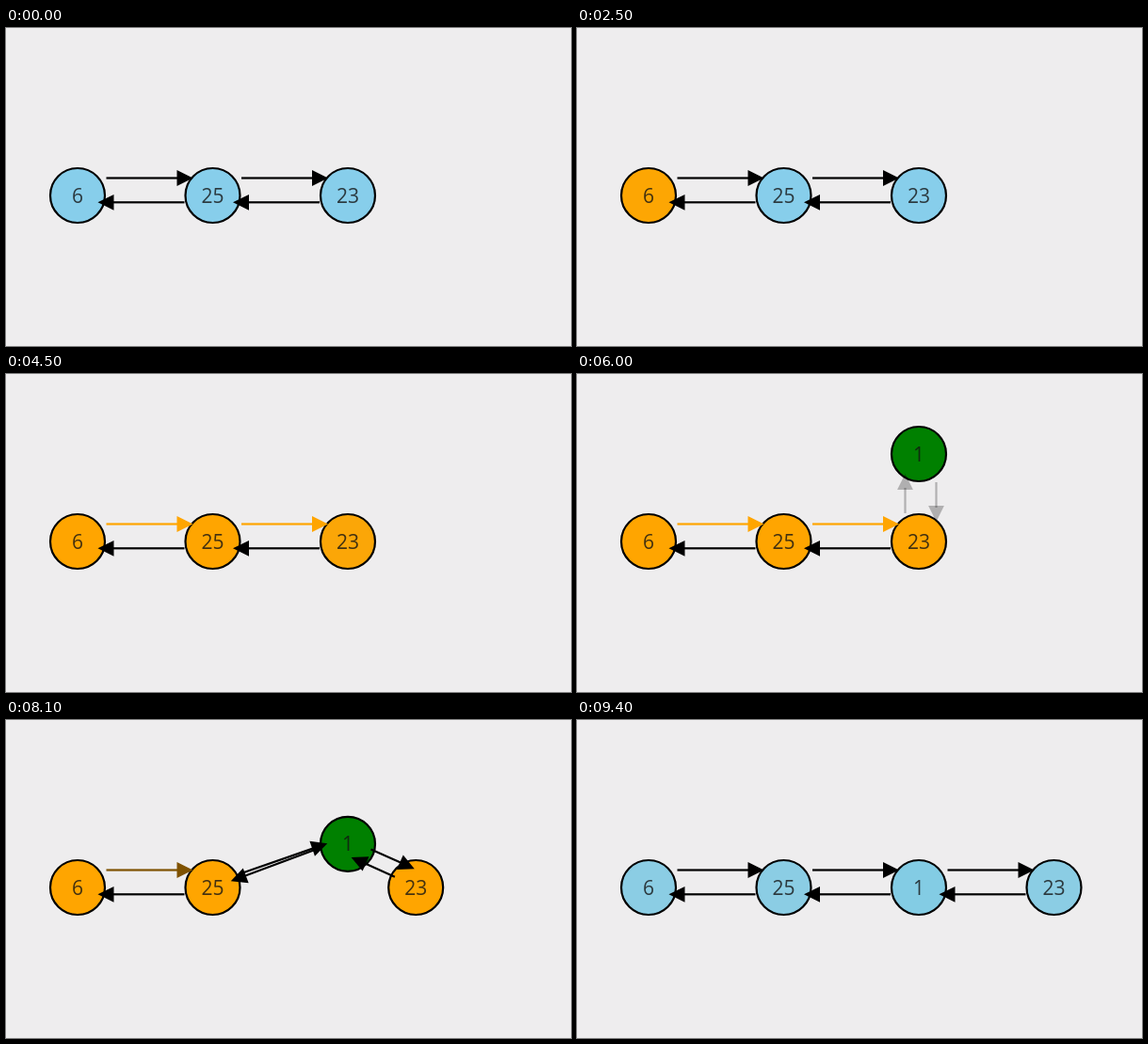
An HTML page with a canvas for the animation above (9.5 s loop, 600 by 338 pixels).

```html
<!DOCTYPE html>
<html lang="en">
<head>
<meta charset="utf-8">
<title>Linked list insertion</title>
<style>
html, body { margin: 0; width: 100%; height: 100%; overflow: hidden; background: #eeedee; }
canvas { display: block; width: 600px; height: 338px; }
</style>
</head>
<body>
<canvas id="stage" width="600" height="338"></canvas>
<script>
const ctx = document.getElementById('stage').getContext('2d');
const LOOP = 9500;
const SKY = [135, 206, 235], ORANGE = [255, 165, 0], GREEN = [0, 128, 0], BLACK = [0, 0, 0];
const ROW = 178;

// Cubic ease-in-out progress of a step
function step(t, start, length = 1000) {
  const p = Math.min(1, Math.max(0, (t - start) / length));
  return p < 0.5 ? 4 * p ** 3 : 1 - 4 * (1 - p) ** 3;
}

const lerp = (a, b, p) => a + (b - a) * p;
const mix = (a, b, p) => a.map((v, i) => lerp(v, b[i], p));
const rgb = c => `rgb(${c.map(Math.round).join(',')})`;

function node(x, y, label, color, alpha = 1) {
  ctx.globalAlpha = alpha;
  ctx.beginPath();
  ctx.arc(x, y, 29, 0, Math.PI * 2);
  ctx.fillStyle = rgb(color);
  ctx.fill();
  ctx.lineWidth = 2.2;
  ctx.strokeStyle = '#000';
  ctx.stroke();
  ctx.fillStyle = 'rgba(20,20,20,0.8)';
  ctx.fillText(label, x, y + 7.5);
  ctx.globalAlpha = 1;
}

function arrow([x1, y1, x2, y2], color = BLACK, alpha = 1) {
  const len = Math.hypot(x2 - x1, y2 - y1);
  ctx.save();
  ctx.globalAlpha = alpha;
  ctx.translate(x1, y1);
  ctx.rotate(Math.atan2(y2 - y1, x2 - x1));
  ctx.fillStyle = rgb(color);
  ctx.fillRect(0, -1.1, len - 15, 2.2);
  ctx.beginPath();
  ctx.moveTo(len, 0);
  ctx.lineTo(len - 17, -8.4);
  ctx.lineTo(len - 17, 8.4);
  ctx.fill();
  ctx.restore();
}

// Resting links to the right and left of a node
const next = x => [x + 30.5, 159.5, x + 122.5, 159.5];
const prev = x => [x + 113.5, 185.3, x + 21.5, 185.3];

const X = [76, 219.5, 363, 506.5];
const UP = [254, 165, 340.5, 102.5];
const DOWN = [333.5, 86, 236.5, 157];
const TO_LAST = [381.5, 115, 381.5, 157];
const FROM_LAST = [348.5, 148, 348.5, 106];

function draw(t) {
  ctx.fillStyle = '#eeedee';
  ctx.fillRect(0, 0, 600, 338);
  ctx.font = '21px "Open Sans", "Noto Sans", sans-serif';
  ctx.textAlign = 'center';

  const relink = step(t, 6600);
  const move = step(t, 7600);
  const reset = step(t, 8600);
  const visited = start => mix(mix(SKY, ORANGE, step(t, start)), SKY, reset);

  node(X[0], ROW, '6', visited(1650));
  node(X[1], ROW, '25', visited(2740));
  node(lerp(X[2], X[3], move), ROW, '23', visited(3700));
  const shown = step(t, 4750, 300);
  if (shown > 0) node(X[2], lerp(85, ROW, move), '1', mix(GREEN, SKY, reset), shown);

  const lit = (start, fade) => t < start ? BLACK : mix(ORANGE, BLACK, fade);
  arrow(next(X[0]), lit(2750, move));
  arrow(prev(X[0]));
  arrow(mix(mix(next(X[1]), UP, relink), next(X[1]), move), lit(3750, relink));
  arrow(mix(mix(prev(X[1]), DOWN, relink), prev(X[1]), move));

  const linked = step(t, 5600);
  if (linked > 0) {
    arrow(mix(TO_LAST, next(X[2]), move), BLACK, linked);
    arrow(mix(FROM_LAST, prev(X[2]), move), BLACK, linked);
  }
}

const begin = performance.now();
function frame() {
  draw((performance.now() - begin) % LOOP);
  requestAnimationFrame(frame);
}
frame();
</script>
</body>
</html>
```
